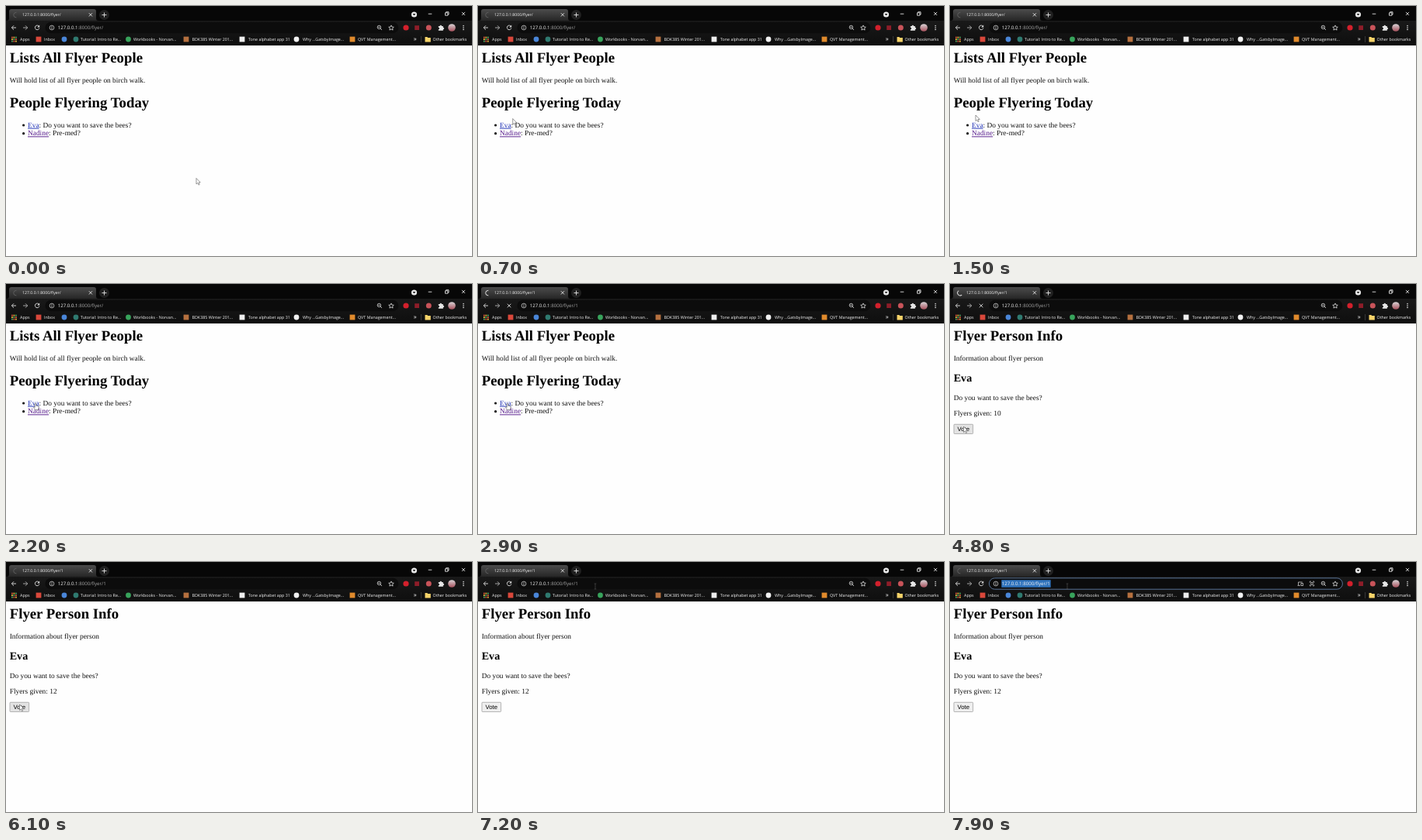
Animation of 600x323 px, one loop 8 s. Source, as an HTML page:

```html
<!DOCTYPE html>
<html lang="en">
<head>
<meta charset="utf-8">
<title>Flyer list</title>
<style>
  html, body { margin: 0; width: 100%; height: 100%; overflow: hidden; background: #fefefe; }
  svg { display: block; width: 100vw; height: 100vh; }
  text { text-rendering: geometricPrecision; white-space: pre; }
  .ui { font-family: "Open Sans", "Noto Sans", sans-serif; fill: #f4f4f4; }
  .tab { font-size: 5.2px; }
  .url { font-size: 6.1px; }
  .mark { font-size: 5.35px; }
  .page { font: 9.4px "Liberation Serif", "Times New Roman", serif; fill: #111; }
  .h1 { font-size: 18.8px; font-weight: bold; fill: #000; }
  .h2 { font-size: 14.1px; font-weight: bold; fill: #000; }
  .btn { font: 7.8px "Liberation Sans", Arial, sans-serif; fill: #000; }
  .line { fill: none; stroke: #e2e2e2; stroke-width: .9; }
  .link { text-decoration: underline; }
</style>
</head>
<body>
<svg viewBox="0 0 600 323" preserveAspectRatio="none">
  <defs>
    <linearGradient id="tabFill" x2="0" y2="1">
      <stop offset="0" stop-color="#4c4c4c"/><stop offset="1" stop-color="#262626"/>
    </linearGradient>
    <linearGradient id="barFill" x2="0" y2="1">
      <stop offset="0" stop-color="#191919"/><stop offset="1" stop-color="#0e0e0e"/>
    </linearGradient>
    <linearGradient id="photo" x2="0" y2="1">
      <stop offset="0" stop-color="#d8d4d6"/><stop offset="1" stop-color="#a8505c"/>
    </linearGradient>
  </defs>
  <rect width="600" height="323" fill="#fefefe"/>

  <!-- tab strip -->
  <rect width="600" height="20" fill="#070707"/>
  <path d="M1 19Q4 19 4 16V7Q4 4 7 4H113Q116 4 116 7V16Q116 19 119 19Z" fill="url(#tabFill)"/>
  <path id="spinner" fill="none" stroke-width="1" stroke-linecap="round" d="M13 8.3A3.3 3.3 0 0 0 13 14.9"/>
  <text id="title" class="ui tab" x="21" y="13"></text>
  <path class="line" d="M106.8 9.2l4.2 4.2m0-4.2l-4.2 4.2"/>
  <circle cx="126.5" cy="11.5" r="6.5" fill="#202020"/>
  <path class="line" d="M123.5 11.5h6m-3-3v6"/>
  <circle cx="525.5" cy="11" r="3.6" fill="#e6e6e6"/>
  <path d="M523.7 10.1h3.6l-1.8 2.2z" fill="#111"/>
  <path class="line" d="M543.7 10.2h4.6M565.5 8.8h3.4v3.4h-3.4zM566.6 8.8V7.7h3.4v3.4h-1M587 7.9l4 4m0-4l-4 4"/>

  <!-- toolbar -->
  <rect y="19" width="600" height="32" fill="url(#barFill)"/>
  <path class="line" d="M13 28H7.4m2.6-2.7L7.3 28l2.7 2.7"/>
  <path class="line" style="stroke:#b4b4b4" d="M22 28h5.6m-2.6-2.7l2.7 2.7l-2.7 2.7"/>
  <g id="reload">
    <path class="line" d="M42.5 26.3A2.8 2.8 0 1 0 42.9 28.6"/>
    <path d="M43.2 24.6v2.9h-2.9z" fill="#e2e2e2"/>
  </g>
  <path id="stop" class="line" d="M37.8 25.7l4.6 4.6m0-4.6l-4.6 4.6"/>
  <rect id="omnibox" x="50.4" y="20.8" width="455" height="14.4" rx="7.2" fill="#0c0c0c"/>
  <circle class="line" cx="59" cy="28" r="2.9" style="stroke-width:.7"/>
  <path class="line" d="M59 27.6v2M59 26.1v.7"/>
  <rect id="selection" x="66.3" y="23.2" width="63.4" height="9.6" fill="#2f73bd"/>
  <text class="ui url" x="66.8" y="30.3">127.0.0.1<tspan id="path"></tspan></text>
  <g id="focusIcons" class="line" style="stroke-width:.7">
    <path d="M448.5 30.2V26h5.2M447.5 30.4h3.4M452 27.5h2.6v3H452z"/>
    <path d="M463.3 26.7v-1.6h1.6m2.2 0h1.6v1.6m0 2.6v1.6h-1.6m-2.2 0h-1.6v-1.6M464.8 26.6h2.4v2.8h-2.4z"/>
  </g>
  <g class="line" style="stroke-width:.8">
    <circle cx="480.4" cy="27.4" r="2.2"/>
    <path d="M482 29l2 2M479.3 27.4h2.2"/>
    <path d="M496 24.9l1 2.1 2.3.3-1.7 1.5.5 2.3-2.1-1.2-2.1 1.2.5-2.3-1.7-1.5 2.3-.3z"/>
  </g>
  <circle cx="515" cy="28" r="3.6" fill="#d3202c"/>
  <rect x="526.2" y="25.2" width="5.8" height="5.8" fill="#8e1d29"/>
  <circle cx="544.3" cy="28" r="3.5" fill="#c9545a"/>
  <path d="M556.8 26h1.8a1.2 1.2 0 0 1 2.4 0h1.8v1.8a1.2 1.2 0 0 1 0 2.4v1.6h-6v-1.6a1.2 1.2 0 0 0 0-2.4z" fill="#e6e6e6"/>
  <circle cx="574" cy="28" r="4.8" fill="url(#photo)"/>
  <g fill="#dedede"><circle cx="589" cy="25.6" r=".8"/><circle cx="589" cy="28" r=".8"/><circle cx="589" cy="30.4" r=".8"/></g>

  <!-- bookmarks -->
  <g id="marks"></g>
  <text class="ui" font-size="8" x="524.7" y="45.3">»</text>
  <path d="M534.5 39v8" stroke="#4a4a4a" stroke-width=".7"/>
  <path d="M539.5 40h2.8l.9 1.1h3.6v5.4h-7.3z" fill="#f6d369"/>

  <!-- pages -->
  <g id="list" class="page">
    <text class="h1" x="4.7" y="73.3">Lists All Flyer People</text>
    <text x="4.7" y="99.1">Will hold list of all flyer people on birch walk.</text>
    <text class="h1" x="4.7" y="130.6">People Flyering Today</text>
    <circle cx="22.6" cy="154" r="1.6"/>
    <text x="28" y="156.7"><tspan class="link" fill="#2536b8">Eva</tspan>: Do you want to save the bees?</text>
    <circle cx="22.6" cy="164.7" r="1.6"/>
    <text x="28" y="167.4"><tspan class="link" fill="#551a8b">Nadine</tspan>: Pre-med?</text>
  </g>
  <g id="info" class="page">
    <text class="h1" x="4.7" y="73.3">Flyer Person Info</text>
    <text x="4.7" y="99.1">Information about flyer person</text>
    <text class="h2" x="4.7" y="125.8">Eva</text>
    <text x="4.7" y="149.5">Do you want to save the bees?</text>
    <text x="4.7" y="169.5">Flyers given: <tspan id="count"></tspan></text>
    <rect id="vote" x="5" y="181.3" width="24.6" height="12.2" rx=".8" stroke="#9a9a9a" stroke-width=".7"/>
    <text class="btn" x="17.3" y="190.2" text-anchor="middle">Vote</text>
  </g>

  <g id="cursor">
    <path id="arrow" d="M0 0V7.6L1.7 6L3 8.7L4.2 8.1L3 5.5H5.3Z" fill="#fff" stroke="#555" stroke-width=".6"/>
    <path id="hand" d="M-.8 .5Q0-.5.8.5V3.2L3.6 3.9Q4.3 4.2 4.2 5L3.6 8.4H-.4L-2.6 5.4Q-2.4 4.3-.8 5.4Z" fill="#fff" stroke="#555" stroke-width=".6"/>
    <path id="beam" d="M-1.3 0H1.3M0 0V7M-1.3 7H1.3" stroke="#555" stroke-width=".6"/>
  </g>
</svg>
<script>
const LOOP = 8000, STEP = 100;
const $ = id => document.getElementById(id);
const show = (id, on) => $(id).setAttribute("visibility", on ? "visible" : "hidden");

// icon centre, icon colour, rounded?, label x, label
const marks = [
  [42, "#d9483b", 0, 49, "Inbox"],
  [75, "#4a86d8", 1, 0, ""],
  [90, "#2f7a70", 1, 96, "Tutorial: Intro to Re..."],
  [157.5, "#38a45c", 1, 164, "Workbooks - Norvan..."],
  [232, "#b5703f", 0, 239.5, "BDK385 Winter 201..."],
  [304, "#eeeeee", 0, 312, "Tone alphabet app 31"],
  [374, "#f2f2f2", 1, 382, "Why ...GatsbyImage..."],
  [446, "#e08a2c", 0, 453, "QVT Management..."]
];
const label = (x, s) => `<text class="ui mark" x="${x}" y="45">${s}</text>`;
const dots = ["#e0503f", "#e8b93a", "#4aa860"];
let html = label(18, "Apps") + label(549.5, "Other bookmarks");
for (let i = 0; i < 9; i++) {
  const col = i % 3, row = (i - col) / 3;
  html += `<rect x="${7 + col * 2.5}" y="${39.7 + row * 2.5}" width="1.8" height="1.8" fill="${dots[(col + row) % 3]}"/>`;
}
for (const [x, color, round, tx, name] of marks) {
  html += `<rect x="${x - 3.4}" y="39.6" width="6.8" height="6.8" rx="${round ? 3.4 : 0}" fill="${color}"/>` + label(tx, name);
}
$("marks").innerHTML = html;

// time, x, y of the pointer tip
const route = [
  [100, 245, 222.5], [800, 33, 141], [1500, 33, 141], [1800, 38, 154], [2900, 38, 154],
  [3300, 38.5, 151.5], [3700, 38.5, 151.5], [4400, 17.5, 184], [6400, 17.5, 184],
  [7200, 151, 28], [LOOP, 151, 28]
];
const loads = [[2400, 3300], [4600, 5100], [5500, 5900]];
const between = (t, a, b) => t >= a && t < b;

function pointer(t) {
  const i = route.findIndex(p => t <= p[0]);
  if (i < 1) return route[0].slice(1);
  const [t0, x0, y0] = route[i - 1], [t1, x1, y1] = route[i];
  const u = (t - t0) / (t1 - t0), e = u * u * (3 - 2 * u);
  return [x0 + (x1 - x0) * e, y0 + (y1 - y0) * e];
}

function draw(t) {
  const loading = loads.some(([a, b]) => between(t, a, b));
  const visited = t >= loads[0][0], onInfo = t >= loads[0][1], focused = t >= 7400;
  const address = ":8000/flyer/" + (visited ? "1" : "");

  $("title").textContent = "127.0.0.1" + address;
  $("path").textContent = address;
  $("path").setAttribute("fill", focused ? "#f4f4f4" : "#a4a4a4");
  $("spinner").setAttribute("stroke", loading ? "#e0e0e0" : "#5c5c5c");
  $("spinner").setAttribute("transform", `rotate(${loading ? (t - 2900) * .36 : 0} 13 11.6)`);
  show("reload", !loading);
  show("stop", loading);
  show("selection", focused);
  show("focusIcons", focused);
  $("omnibox").setAttribute("stroke", focused ? "#587296" : "none");

  show("list", !onInfo);
  show("info", onInfo);
  $("count").textContent = t < loads[1][1] ? 10 : t < loads[2][1] ? 11 : 12;
  $("vote").setAttribute("fill", between(t, 4300, 6500) ? "#e3e3e3" : "#efefef");

  const [x, y] = pointer(t);
  const hand = between(t, 1700, 3300), beam = t >= 7200;
  $("cursor").setAttribute("transform", `translate(${x} ${y})`);
  show("arrow", !hand && !beam);
  show("hand", hand);
  show("beam", beam);
}

function tick() {
  draw(Math.floor(performance.now() % LOOP / STEP) * STEP);
  requestAnimationFrame(tick);
}
tick();
</script>
</body>
</html>
```
